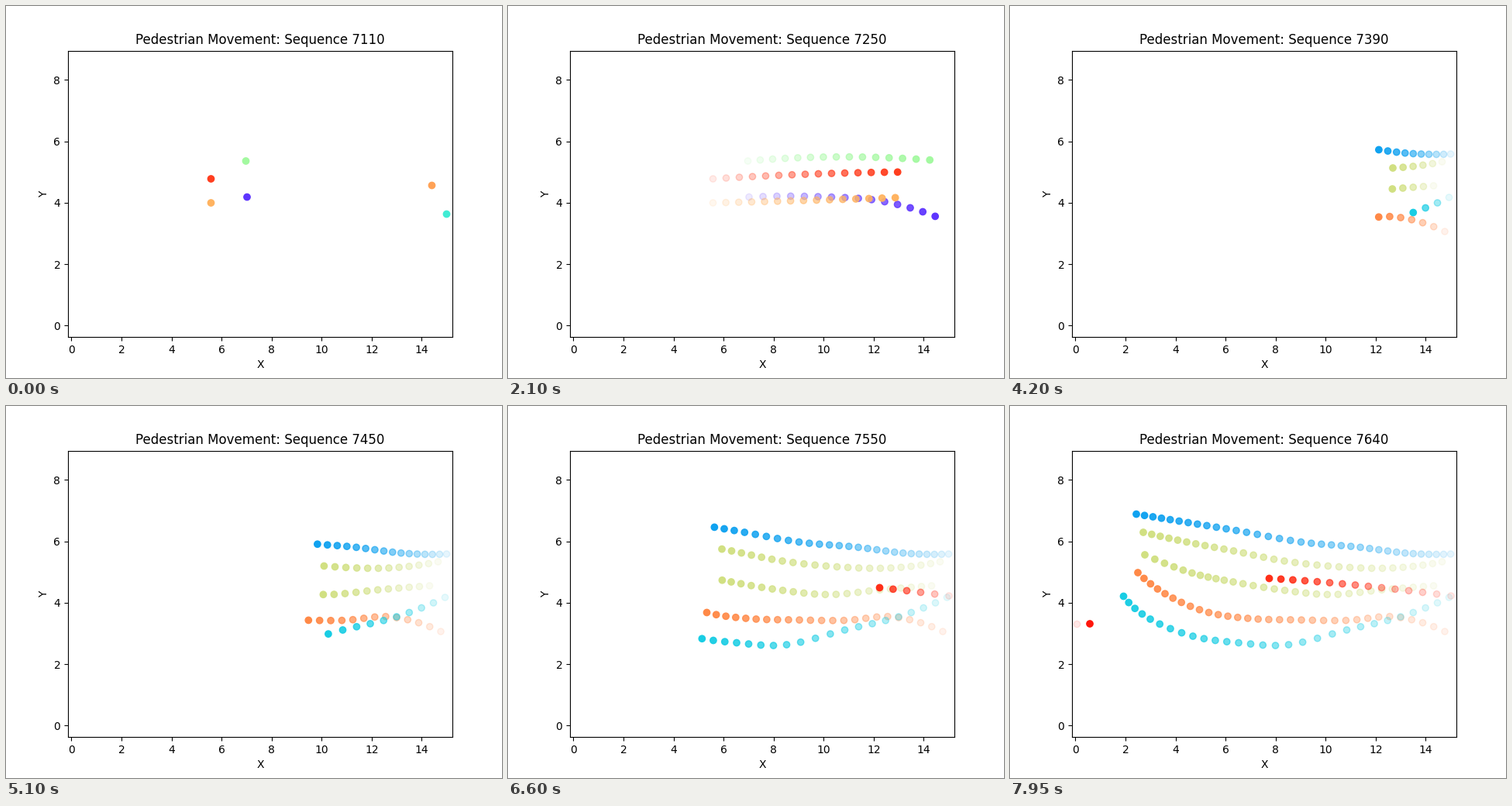
Write a matplotlib script that moves like this. It is 640 px wide and 480 px high and loops after 8 s.

```python
import matplotlib.pyplot as plt
import numpy as np
from matplotlib.animation import FuncAnimation

STEP_MS, TICK_MS, LOOP_MS = 150, 50, 8000
FIRST_SEQUENCE, SEQUENCE_STEP = 7110, 10
OLDEST_ALPHA = 0.1
ORIGIN = np.array([84.4, 412.38])     # stage pixel of data (0, 0)
SCALE = np.array([32.29, -39.62])     # pixels per data unit

walkers = []


def smooth_path(key_points, count):
    """Cubic Hermite curve through key points evenly spaced in time."""
    p = np.array(key_points, float)
    if len(p) < 3:
        return np.linspace(p[0], p[-1], count)
    slopes = np.gradient(p, axis=0, edge_order=2)
    t = np.linspace(0, len(p) - 1, count)
    i = np.minimum(t.astype(int), len(p) - 2)
    u = (t - i)[:, None]
    return ((1 + 2 * u) * (1 - u) ** 2 * p[i] + u * (1 - u) ** 2 * slopes[i]
            + u ** 2 * (3 - 2 * u) * p[i + 1] + u ** 2 * (u - 1) * slopes[i + 1])


def walker(hue, first, last, *key_points):
    """Add a walker seen from step first to last, passing the given stage pixels."""
    path = (smooth_path(key_points, last - first + 1) - ORIGIN) / SCALE
    walkers.append((first, path, plt.cm.rainbow(hue)))


# Heading right
walker(0.57, 0, 15, (309.5, 200), (432, 194.7), (562, 200))
walker(0.92, 0, 18, (264.5, 223), (417.5, 216), (571, 214))
walker(0.07, 0, 15, (311, 246.5), (400, 246), (486, 252.5), (567, 278))
walker(0.75, 0, 18, (264.5, 254), (415, 250), (568, 245))
walker(0.78, 0, 1, (549.5, 231.5), (566, 231))
walker(0.375, 0, 0, (568.5, 268.5))

# Heading left
walker(0.22, 19, 53, (568.5, 191), (513.3, 190), (448, 181.9), (375.5, 175.5),
       (296.3, 161.4), (226, 149.8), (163, 139.5))
walker(0.82, 22, 53, (561, 291), (498, 272.2), (435.4, 276.6), (372, 276),
       (310.6, 274.3), (254.8, 266), (204.3, 244.7), (165, 215))
walker(0.66, 23, 53, (557.5, 201), (494, 209), (424.5, 207.5), (354, 200),
       (288.5, 187), (228, 175.5), (172, 163))
walker(0.66, 24, 53, (546.5, 232), (482, 237), (414, 243.3), (347.8, 237),
       (284, 226.2), (233, 214.9), (174, 192))
walker(0.3, 25, 53, (566.5, 247), (504, 272), (434.5, 289), (359.5, 308),
       (295, 305.5), (236, 297), (181, 275), (146.5, 245.5))
walker(0.94, 39, 53, (569, 245), (445.5, 231), (334.5, 222.5))
walker(0.97, 52, 53, (86.5, 281.5), (103, 281))


fig, ax = plt.subplots(figsize=(6.4, 4.8), dpi=100)
ax.set_xlim((np.array([80, 576]) - ORIGIN[0]) / SCALE[0])
ax.set_ylim((np.array([427.2, 57.6]) - ORIGIN[1]) / SCALE[1])
ax.set_xticks(range(0, 15, 2))
ax.set_yticks(range(0, 9, 2))
ax.set_xlabel("X")
ax.set_ylabel("Y")
title = ax.set_title("")
dots = ax.scatter([], [])


def draw(tick):
    step = tick * TICK_MS // STEP_MS
    points, colors = [np.empty((0, 2))], [np.empty((0, 4))]
    for first, path, color in walkers:
        count = step - first + 1
        if 1 <= count <= len(path):
            shades = np.tile(color, (count, 1))
            shades[:, 3] = np.linspace(1, OLDEST_ALPHA, count)[::-1]
            points.append(path[:count])
            colors.append(shades)
    dots.set_offsets(np.vstack(points))
    dots.set_facecolor(np.vstack(colors))
    dots.set_edgecolor(np.vstack(colors))
    title.set_text(f"Pedestrian Movement: Sequence {FIRST_SEQUENCE + SEQUENCE_STEP * step}")
    return dots, title


animation = FuncAnimation(fig, draw, frames=LOOP_MS // TICK_MS, interval=TICK_MS,
                          repeat=True, repeat_delay=0)
plt.show()
```
